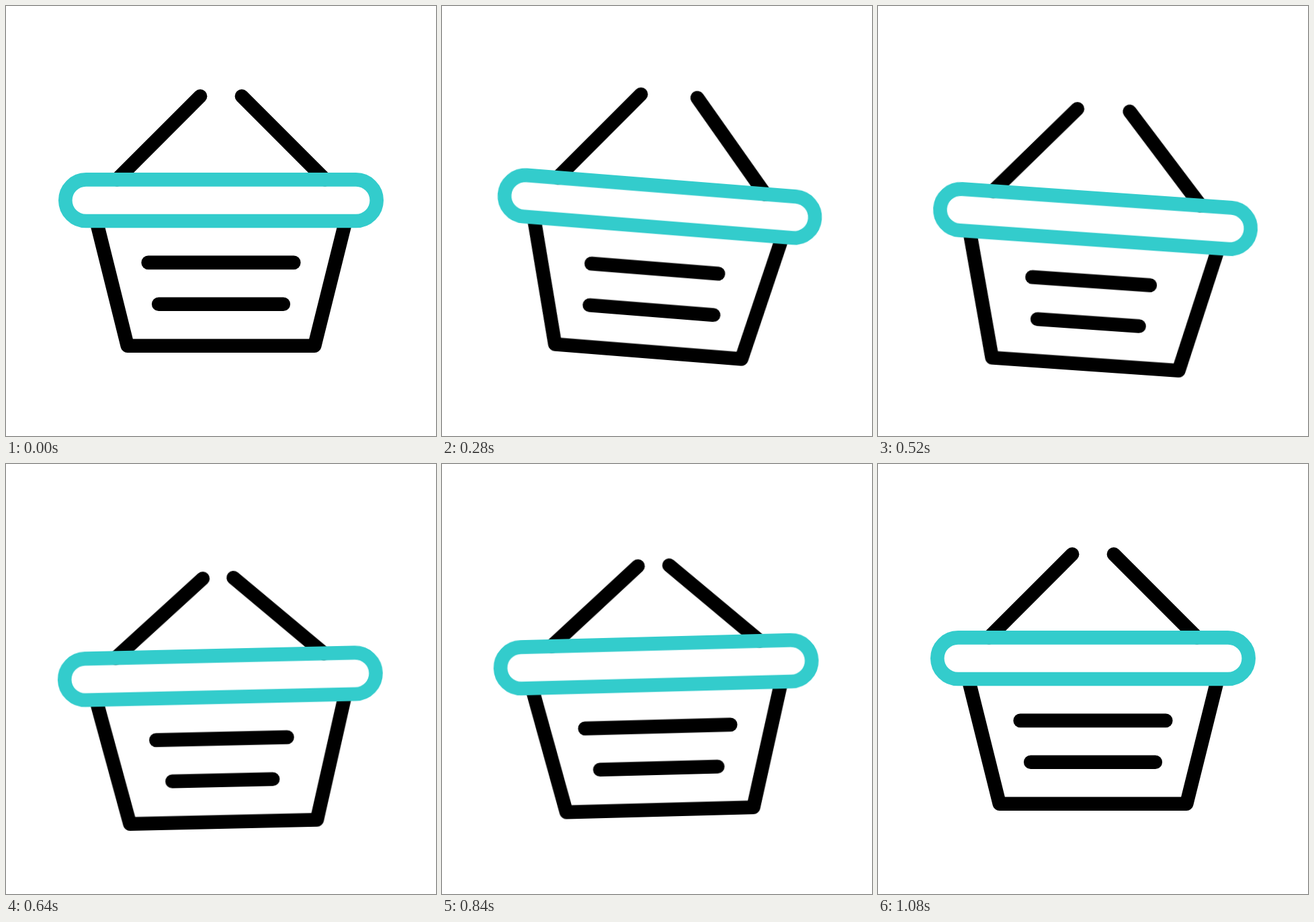
Recreate the animation shown at these times as an HTML page without scripts. Size 640 by 640 pixels, loop 1200 ms.

```html
<!DOCTYPE html>
<html lang="en">
<head>
<meta charset="utf-8">
<title>Basket</title>
<style>
  html, body { margin: 0; height: 100%; overflow: hidden; background: #fff; }
  svg { display: block; width: 100%; height: 100%; }

  svg * {
    animation: 1.2s cubic-bezier(.55, 0, .45, 1) infinite;
  }
  .ink, .rim { fill: none; stroke: #000; stroke-width: 20.6; stroke-linejoin: round; }
  .round { stroke-linecap: round; }
  .rim { stroke: #33cccc; }

  .drop { animation-name: drop; }
  .tilt { animation-name: tilt; transform-origin: 320px 341px; }
  .left { animation-name: swing-left; transform-origin: 165.3px 258.1px; }
  .right { animation-name: swing-right; transform-origin: 474.7px 258.1px; }
  .line { stroke-dasharray: 100 100; }
  .upper { animation-name: trim-upper; }
  .lower { animation-name: trim-lower; }

  @keyframes drop {
    0%, 6.667%, 86.667%, 100% { transform: translateY(0); }
    46.667% { transform: translateY(28px); }
  }
  @keyframes tilt {
    0%, 6.667%, 86.667%, 100% { transform: rotate(0deg); }
    33.333% { transform: rotate(6deg); }
    60% { transform: rotate(-2deg); }
  }
  @keyframes swing-left {
    0%, 6.667%, 86.667%, 100% { transform: rotate(0deg); }
    33.333% { transform: rotate(-6deg); }
    60% { transform: rotate(4.9deg); }
  }
  @keyframes swing-right {
    0%, 6.667%, 86.667%, 100% { transform: rotate(0deg); }
    33.333% { transform: rotate(7deg); }
    60% { transform: rotate(-4.9deg); }
  }
  /* both lines shorten by a tenth at each end, the lower one later */
  @keyframes trim-upper {
    0%, 6.667%, 70%, 100% { stroke-dasharray: 100 100; stroke-dashoffset: 0; }
    36.667% { stroke-dasharray: 80 100; stroke-dashoffset: -10; }
  }
  @keyframes trim-lower {
    0%, 20%, 83.333%, 100% { stroke-dasharray: 100 100; stroke-dashoffset: 0; }
    50% { stroke-dasharray: 80.4 100; stroke-dashoffset: -9.8; }
  }
</style>
</head>
<body>
<svg viewBox="0 0 640 640">
  <g class="drop">
    <g class="tilt">
      <path class="ink round left" d="M165.3 258.1 289.1 134.3"/>
      <path class="ink round right" d="M474.7 258.1 350.9 134.3"/>
      <path class="ink" d="M134.4 319.7 180.8 505.7H459.2L505.6 319.7"/>
      <path class="ink round line upper" pathLength="100" d="M211.7 381.9H428.3"/>
      <path class="ink round line lower" pathLength="100" d="M227.2 443.8H412.8"/>
      <rect class="rim" x="88.3" y="258.4" width="463.4" height="61.6" rx="30.8"/>
    </g>
  </g>
</svg>
</body>
</html>
```
